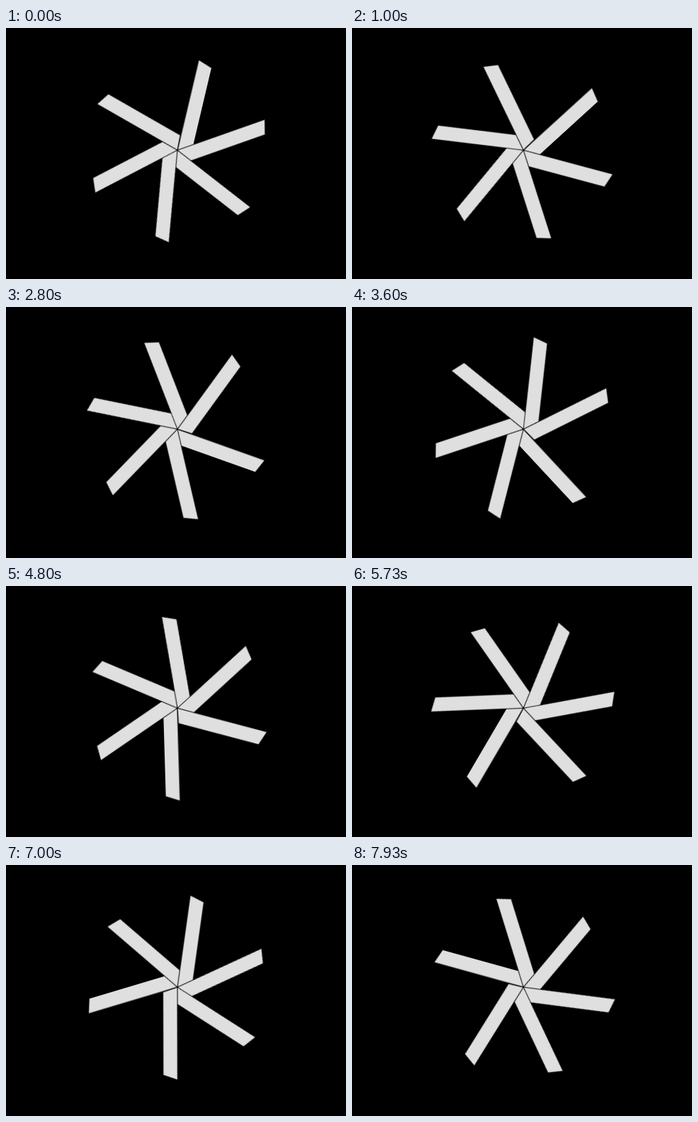
Recreate the animation shown at these times as an HTML page. Size 480 by 354 pixels, loop 8000 ms.

```html
<!DOCTYPE html>
<html lang="en">
<head>
<meta charset="utf-8">
<title>Rotating blades</title>
<style>
  html, body { margin: 0; width: 100%; height: 100%; overflow: hidden; background: #000; }
  svg { display: block; width: 480px; height: 354px; }

  .blade { fill: #dfdfdf; stroke: #000; stroke-width: 1; }

  /* 15 poses a second, 0.04 rad each, with a slight lag late in the loop */
  .wheel {
    transform-origin: 0 0;
    animation: turn 8s -4ms infinite;
  }
  @keyframes turn {
    0%       { transform: rotate(0rad);    animation-timing-function: steps(86); }
    71.6667% { transform: rotate(3.44rad); animation-timing-function: steps(19); }
    87.5%    { transform: rotate(4.19rad); animation-timing-function: steps(15); }
    100%     { transform: rotate(4.79rad); }
  }
</style>
</head>
<body>
<svg viewBox="0 0 480 354" aria-hidden="true">
  <defs>
    <path id="blade" class="blade" d="M0 0H131L124 20.5H7Z"/>
  </defs>
  <g transform="translate(242 172.3) rotate(-76.7)">
    <!-- Blades sit one radian apart; each covers the root of the one before -->
    <g class="wheel">
      <use href="#blade"/>
      <use href="#blade" transform="rotate(57.296)"/>
      <use href="#blade" transform="rotate(114.592)"/>
      <use href="#blade" transform="rotate(171.887)"/>
      <use href="#blade" transform="rotate(229.183)"/>
      <use href="#blade" transform="rotate(286.479)"/>
    </g>
  </g>
</svg>
</body>
</html>
```
